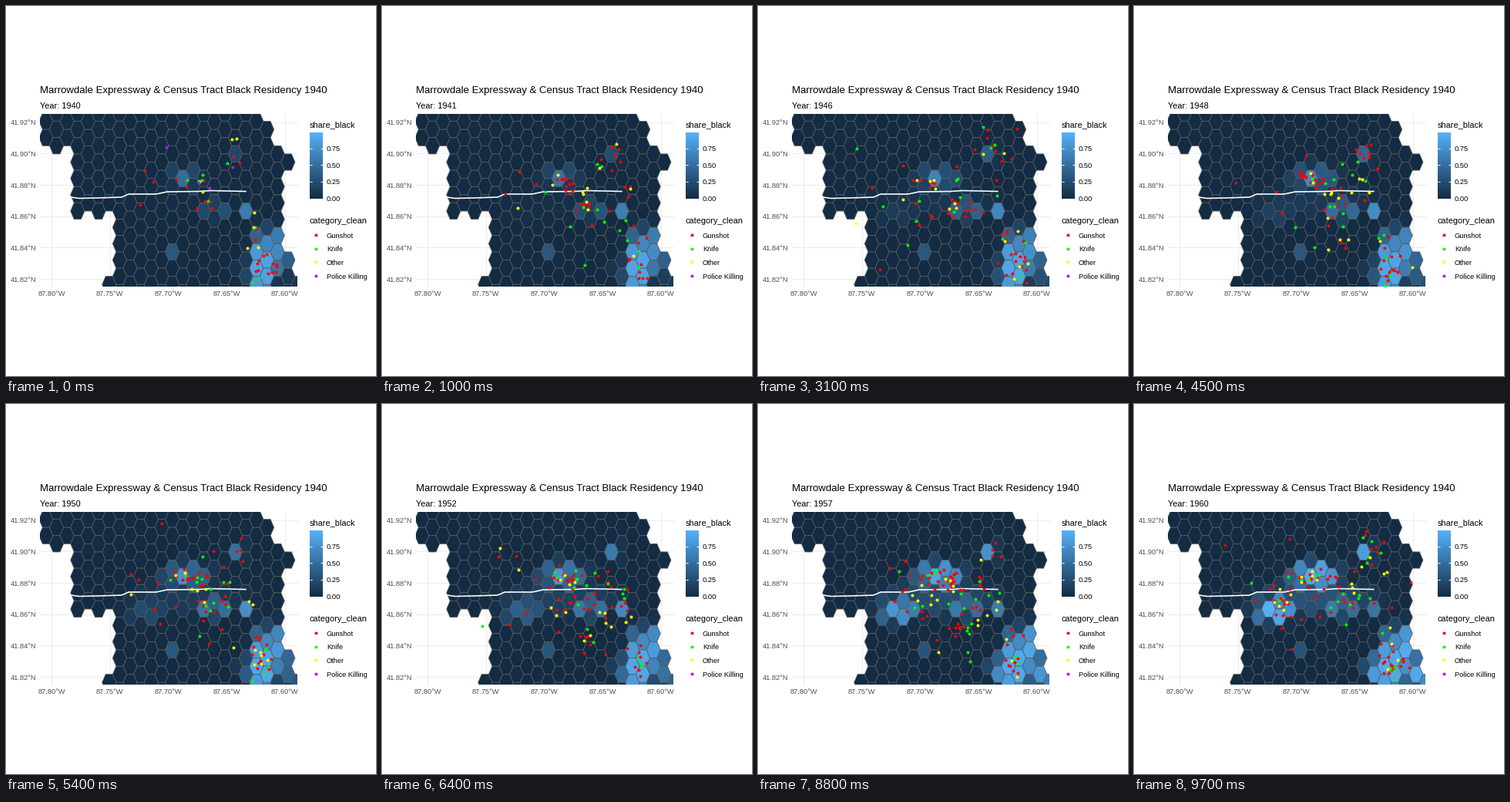
Recreate the animation shown at these times as a matplotlib script. Size 480 by 480 pixels, loop 10 s.

```python
import numpy as np
import matplotlib.pyplot as plt
from matplotlib.animation import FuncAnimation
from matplotlib.collections import PolyCollection
from matplotlib.patches import Rectangle

plt.rcParams["font.family"] = "Liberation Sans"

LOW = np.array([0x13, 0x2B, 0x43]) / 255
HIGH = np.array([0x56, 0xB1, 0xF7]) / 255
COLORS = {"Gunshot": "#FF0000", "Knife": "#00FF00",
          "Other": "#FFFF00", "Police Killing": "#A020F0"}
LEFT, TOP, WIDTH, HEIGHT = 44, 140, 334, 224

# --- hexagon map: odd columns sit half a row higher than even ones ---
STEP_X, STEP_Y = 13.65, 21.17


def center(col, row):
    shift = 0 if col % 2 else STEP_Y / 2
    return 51.9 + STEP_X * col, 139 + STEP_Y * row + shift


def hexagon(x, y):
    r, h = STEP_X / 1.5, STEP_Y / 2
    return [(x - r, y), (x - r / 2, y - h), (x + r / 2, y - h),
            (x + r, y), (x + r / 2, y + h), (x - r / 2, y + h)]


# column: row spans, both ends included; other columns run the full height
SPANS = {0: [(0, 1)], 1: [(0, 2)], 2: [(0, 1)], 3: [(0, 6)], 4: [(0, 5)],
         5: [(0, 6)], 6: [(0, 5), (10, 10)], 21: [(1, 11)], 22: [(2, 10)],
         23: [(3, 3), (9, 11)], 24: [(10, 10)]}
CELLS = np.array([center(c, r) for c in range(25)
                  for a, b in SPANS.get(c, [(0, 11)])
                  for r in range(a, b + 1)])

# --- share by area: x, y, reach in x and y, level in 1940, 1950, 1960 ---
AREAS = np.array([
    (230, 222, 18, 14, .5, .75, .95),
    (235, 222, 34, 18, .08, .45, .95),
    (182, 268, 28, 17, 0, .2, 1),
    (235, 252, 80, 24, .02, .12, .3),
    (262, 264, 18, 14, .22, .55, .6),
    (284, 266, 9, 10, .27, .5, .5),
    (311, 266, 10, 11, .6, .75, .55),
    (299, 192, 13, 14, .2, .5, .85),
    (215, 321, 11, 10, .33, .33, .3),
    (332, 340, 17, 50, .93, .95, .97),
    (353, 318, 16, 32, .7, .8, .95),
    (368, 356, 18, 16, .1, .4, .95),
    (309, 345, 11, 18, .2, .35, .85)])


def falloff(area):
    d = (CELLS - area[:2]) / area[2:4]
    return np.exp(-(d ** 2).sum(axis=1) ** 2)


REACH = np.array([falloff(a) for a in AREAS])


def shade(v):
    return LOW + (HIGH - LOW) * np.clip(v, 0, 1)


def fills(t):
    levels = [np.interp(t, (1940, 1950, 1960), a[4:]) for a in AREAS]
    share = (REACH * np.array(levels)[:, None]).max(axis=0)
    return shade(share[:, None])


# --- incidents by place: x, y, spread in x and y, weight in 1940 and 1960 ---
PLACES = np.array([
    (232, 225, 18, 7, .2, .24),
    (270, 258, 17, 10, .2, .13),
    (304, 192, 11, 16, .14, .11),
    (195, 267, 11, 12, .01, .14),
    (324, 296, 6, 12, .09, .05),
    (334, 338, 12, 15, .24, .22),
    (200, 235, 65, 50, .12, .11)])


def incidents(year):
    rng = np.random.default_rng(year)
    age = (year - 1940) / 20
    weights = PLACES[:, 4] * (1 - age) + PLACES[:, 5] * age
    total = np.interp(year, (1940, 1944, 1955, 1960), (45, 85, 92, 120))
    rare = 4 if year == 1940 else int(rng.random() < .25)
    counts = [total * .6, total * .21, total * .19, rare]
    kinds = {}
    for kind, n in zip(COLORS, counts):
        pick = np.sort(rng.choice(len(PLACES), int(n), p=weights / weights.sum()))
        kinds[kind] = rng.normal(PLACES[pick, :2], PLACES[pick, 2:4])
    return kinds


YEARS = {y: incidents(y) for y in range(1940, 1961)}


def halfway(a, b):
    """Pair points of two years by rank and take the middle of each pair."""
    n = max(len(a), len(b)) if len(a) and len(b) else 0
    ends = [p[np.linspace(0, len(p) - 1, n).astype(int)] for p in (a, b)]
    return (ends[0] + ends[1]) / 2


def points_at(t, kind):
    year = int(t)
    if t == year:
        return YEARS[year][kind]
    return halfway(YEARS[year][kind], YEARS[year + 1][kind])


# --- static parts ---
fig = plt.figure(figsize=(480 / 72, 480 / 72), dpi=72, facecolor="white")
ax = fig.add_axes([0, 0, 1, 1])
panel = Rectangle((LEFT, TOP), WIDTH, HEIGHT, transform=ax.transData)


def label(x, y, s, size, color="black", ha="left"):
    return ax.text(x, y, s, fontsize=size, color=color, ha=ha, va="baseline")


label(44, 113, "Marrowdale Expressway & Census Tract Black Residency 1940",
      13.2)
subtitle = label(44, 133, "", 11)

for i in range(6):
    y = 150.6 + 40.7 * i
    ax.plot([LEFT, LEFT + WIDTH], [y, y], color="#EBEBEB", lw=1, zorder=1)
    label(39, y + 3.5, f"{41.92 - .02 * i:.2f}°N", 9.2, "#4D4D4D", "right")
for i in range(5):
    x = 59 + 75.7 * i
    ax.plot([x, x], [TOP, TOP + HEIGHT], color="#EBEBEB", lw=1, zorder=1)
    label(x, 376.5, f"{87.8 - .05 * i:.2f}°W", 9.2, "#4D4D4D", "center")

label(394, 157, "share_black", 11)
ax.imshow(shade(np.linspace(1, 0, 86)[:, None, None]), zorder=2,
          extent=(394, 411, 250, 164), aspect="auto", interpolation="nearest")
for i in range(4):
    y = 249.5 - 21.6 * i
    for x in (394, 407.6):
        ax.plot([x, x + 3.4], [y, y], color="white", lw=1, zorder=3,
                solid_capstyle="butt")
    label(416, y + 3.5, f"{.25 * i:.2f}", 9.2)

label(394, 282, "category_clean", 11)
for i, (name, color) in enumerate(COLORS.items()):
    y = 297 + 17.6 * i
    ax.scatter([402], [y], s=16, c=color, lw=0, antialiased=False)
    label(416, y + 3.8, name, 9.2)

# --- moving parts ---
hexes = PolyCollection([hexagon(x, y) for x, y in CELLS],
                       edgecolors="#595959", linewidths=.8, zorder=2)
ax.add_collection(hexes, autolim=False)
ROAD = [(84, 248), (95, 249.5), (118, 249), (150, 248), (159, 244),
        (195, 244), (209, 241), (250, 240.5), (265, 239.5), (311, 240.5)]
road, = ax.plot(*zip(*ROAD), color="white", lw=1.6, zorder=3)
dots = {k: ax.scatter([], [], s=16, c=c, lw=0, antialiased=False, zorder=4)
        for k, c in COLORS.items()}
for artist in (hexes, road, *dots.values()):
    artist.set_clip_path(panel)
ax.set_xlim(0, 480)
ax.set_ylim(480, 0)
ax.axis("off")

# the year starts to change at these frames; all but one pass through a halfway step
STARTS = [*range(5, 51, 5), *range(54, 85, 5), *range(88, 97, 4)]
DIRECT = 50


def time_at(frame):
    passed = sum(s <= frame for s in STARTS)
    between = frame in STARTS and frame != DIRECT
    return 1940 + passed - (.5 if between else 0)


def draw(frame):
    t = time_at(frame)
    subtitle.set_text(f"Year: {int(t)}")
    hexes.set_facecolor(fills(t))
    for kind, dot in dots.items():
        dot.set_offsets(points_at(t, kind))
    return [subtitle, hexes, *dots.values()]


anim = FuncAnimation(fig, draw, frames=100, interval=100, repeat=True,
                     repeat_delay=0, blit=False)
plt.show()
```
